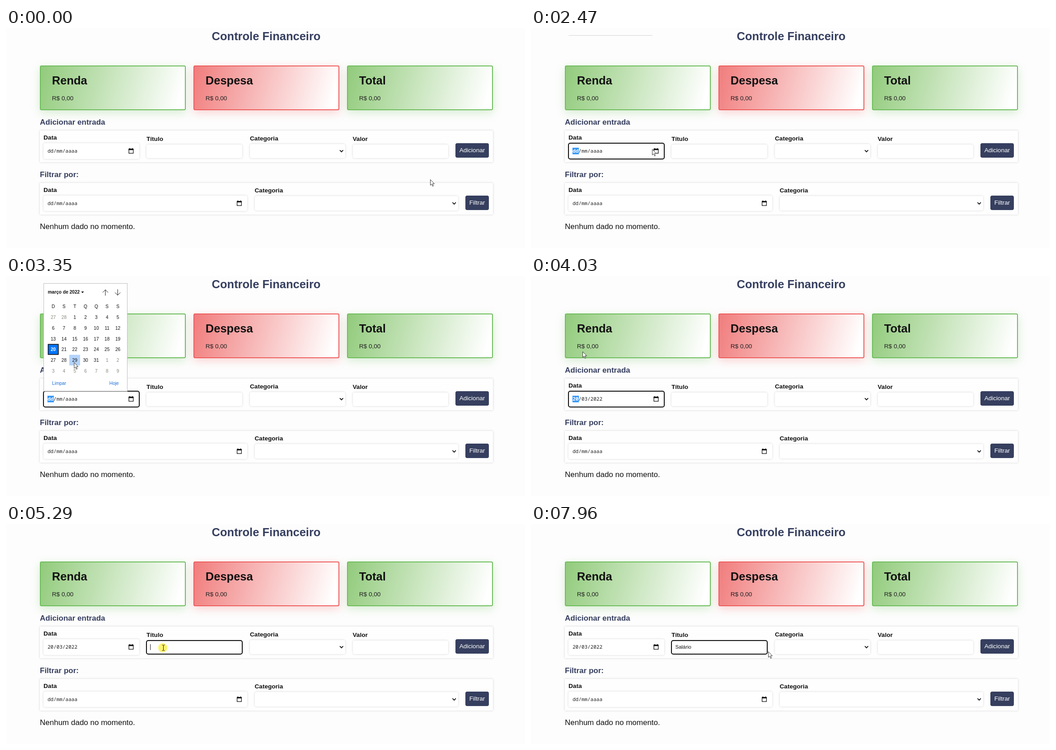
Recreate the animation shown at these times as an HTML page. Size 1149 px wide and 487 px high, loop 8 s.

```html
<!DOCTYPE html>
<html lang="pt-BR">
<head>
<meta charset="utf-8">
<title>Controle Financeiro</title>
<style>
  html, body { margin: 0; width: 100%; height: 100%; overflow: hidden; background: #fdfdfd; }
  #stage { position: relative; width: 1149px; height: 487px; overflow: hidden; }
  #stage div { position: absolute; box-sizing: border-box; }
  svg { position: absolute; left: 0; top: 0; font-family: "Liberation Sans", Arial, sans-serif; }
  .card { border: 2px solid var(--line); border-radius: 3.4px;
    background: linear-gradient(105deg, var(--fill), #fff 95%); box-shadow: 0 6px 20px var(--glow); }
  .green { --line: #6cbd5a; --fill: #92cb7c; --glow: rgba(108, 189, 90, .26); }
  .red { --line: #ee5c5c; --fill: #f17d7d; --glow: rgba(238, 92, 92, .26); }
  .panel { background: #fefefe; box-shadow: 0 0 4px #d0d0d0; }
  .field { background: #fff; border-radius: 4px; box-shadow: 0 0 4px #d6d6d6; }
  .focus { outline: 2px solid #101010; outline-offset: -1px; }
  .button { background: #363f5f; border-radius: 4px; }
  .b { font-weight: bold; }
  .navy { fill: #363f5f; }
  .mono { font: 11px "Noto Sans Mono", monospace; white-space: pre; }
  .mid { text-anchor: middle; }
  .selected { fill: #fff; font-weight: bold; }
  .stroke { fill: none; stroke: #111; }
</style>
</head>
<body>
<div id="stage"></div>
<script>
const LOOP = 8000, FRAME = 70;
const stage = document.getElementById('stage');

const box = (cls, { x, y, w, h, id = '' }) =>
  `<div id="${id}" class="${cls}" style="left:${x}px;top:${y}px;width:${w}px;height:${h}px"></div>`;
const text = (x, y, size, str, cls = '', fill = '#111') =>
  `<text x="${x}" y="${y}" class="${cls}" style="font-size:${size}px" fill="${fill}">${str}</text>`;

const cards = ['Renda', 'Despesa', 'Total'].map((name, i) =>
  ({ name, tone: i === 1 ? 'red' : 'green', x: 75 + 340 * i, y: 83, w: 323, h: 99 }));
const panels = [227, 343].map(y => ({ x: 75, y, w: 1003, h: 70 }));
const fields = [
  { name: 'Data', type: 'date', id: 'entry', x: 83, y: 255, w: 211.5, h: 34.5 },
  { name: 'Título', id: 'title', x: 311, y: 257.5, w: 212, h: 30 },
  { name: 'Categoria', type: 'select', x: 540, y: 256.5, w: 211, h: 31.5 },
  { name: 'Valor', x: 767.5, y: 257.5, w: 211, h: 30 },
  { name: 'Data', type: 'date', id: 'filter', x: 83, y: 371, w: 451, h: 34 },
  { name: 'Categoria', type: 'select', x: 550.5, y: 372, w: 450, h: 32 }
];
const buttons = [
  { name: 'Adicionar', x: 995, y: 255, w: 74, h: 32 },
  { name: 'Filtrar', x: 1017, y: 370.5, w: 52, h: 32 }
];

const dateInput = (x, right, cy, id) =>
  `<text x="${x + 9}" y="${cy + 4}" class="mono" fill="#222"><tspan id="${id}Day">dd</tspan><tspan id="${id}Rest">/mm/aaaa</tspan></text>
  <g transform="translate(${right - 23} ${cy - 5})">
    <path class="stroke" stroke-width="1.3" d="M.6.6h9.6v9.6H.6z"/>
    <path fill="#111" d="M0 0h10.8v3H0zM1.6-1.2h1.6v2H1.6zM7.6-1.2h1.6v2H7.6z"/>
  </g>`;
const chevron = (x, y) =>
  `<path class="stroke" stroke-width="1.8" d="M${x - 3.7} ${y - 1.8}l3.7 3.7 3.7-3.7"/>`;

function fieldContent({ name, type, id, x, y, w, h }) {
  const right = x + w, cy = y + h / 2;
  return text(x, y - 7.7, 13.6, name, 'b') +
    (type === 'date' ? dateInput(x, right, cy, id) : type === 'select' ? chevron(right - 8.3, cy) : '');
}

function calendar() {
  const step = 23.83, colX = c => 104.6 + step * c, rowY = r => 95 + step * r;
  let out = `<rect x="83.5" y="16.5" width="185" height="238.5" fill="#fff" stroke="#bdbdbd"/>
    <rect id="hover" x="140.2" y="174.4" width="23.8" height="23.6" fill="#b3d3fb"/>
    <rect x="93.4" y="151.3" width="22.4" height="22.4" fill="#0075ff" stroke="#101010" stroke-width="1.7"/>
    <path fill="#111" d="M166.5 34.3h6l-3 3.6z"/>
    <path class="stroke" d="M220 43.5v-13M214 36.5l6-6 6 6M247.2 29.5v13M241.2 36.5l6 6 6-6"/>`;
  out += text(92.5, 39, 10.2, 'março de 2022', 'b');
  [...'DSTQQSS'].forEach((d, c) => out += text(colX(c), rowY(-1), 10.2, d, 'mid'));
  for (let i = 0; i < 42; i++) {
    const date = new Date(2022, 1, 27 + i), day = date.getDate(), inMonth = date.getMonth() === 2;
    const cls = inMonth && day === 20 ? 'mid selected' : 'mid';
    out += text(colX(i % 7), rowY(Math.floor(i / 7)), 10.2, day, cls, inMonth ? '#111' : '#8b867c');
  }
  return out + text(102, 240.6, 10.2, 'Limpar', '', '#1a6fd6') + text(228.8, 240.6, 10.2, 'Hoje', '', '#1a6fd6');
}

stage.innerHTML =
  cards.map(c => box('card ' + c.tone, c)).join('') +
  panels.map(p => box('panel', p)).join('') +
  fields.map(f => box('field', f)).join('') +
  buttons.map(b => box('button', b)).join('') +
  `<svg width="1149" height="487">
  <rect id="daySelect" x="91.8" y="265" width="14.2" height="14.6" fill="#3797f5"/>` +
  text(576, 26.7, 25.5, 'Controle Financeiro', 'b navy mid') +
  cards.map(({ name, x }) =>
    text(x + 26.8, 125, 25.5, name, 'b') + text(x + 26.8, 159.7, 13.6, 'R$ 0,00', '', '#222')).join('') +
  text(75, 214, 17, 'Adicionar entrada', 'b navy') +
  text(75, 329.7, 17, 'Filtrar por:', 'b navy') +
  text(75, 445, 17, 'Nenhum dado no momento.') +
  fields.map(fieldContent).join('') +
  buttons.map(b => text(b.x + b.w / 2, b.y + 20.2, 13.6, b.name, 'mid', '#fff')).join('') +
  `<text id="typed" x="319.5" y="276.2" font-size="11.33" fill="#111"></text>
  <rect id="caret" y="266" width="1" height="13" fill="#111"/>
  <path id="opening" class="stroke" style="stroke:#d4d4d4" d="M83 16.5h186"/>
  <g id="calendar">${calendar()}</g>
  <circle id="click" r="10.2" fill="#fbee3c" fill-opacity=".72"/>
  <path id="arrow" d="M.5.6V13.2L3.4 10.5 5.5 15.4 7.4 14.6 5.4 9.8H9.4Z" fill="#fff" stroke="#222" stroke-width=".9"/>
  <path id="beam" class="stroke" d="M-3-6h2.2l.8.7.8-.7H3M0-5.5v11M-3 6h2.2l.8-.7.8.7H3"/></svg>`;

const $ = id => document.getElementById(id);
const show = (id, on) => { $(id).style.display = on ? '' : 'none'; };

// Pointer glides: first frame, last frame, destination
const origin = [939, 335];
const glides = [
  [70, 165, 823, 241], [260, 260, 962, 269], [650, 800, 619, 162], [990, 1200, 272, 255],
  [1450, 1660, 292, 273], [1920, 2030, 268, 268], [2920, 3040, 155, 194], [3350, 3490, 114, 167],
  [4500, 4640, 361, 289], [4960, 5030, 348.5, 274], [7820, 7960, 525, 282]
];

// Each glide accelerates and is seen only at whole frames.
function pointerAt(t) {
  let [x, y] = origin;
  for (const [from, to, toX, toY] of glides) {
    if (t < from) break;
    const steps = Math.round((to - from) / FRAME) + 1;
    const shown = t >= to ? steps : Math.floor((t - from) / (to - from) * (steps - 1)) + 1;
    const k = (shown / steps) ** 2;
    x += (toX - x) * k;
    y += (toY - y) * k;
  }
  return [x, y];
}

const word = 'Salário';
const keyTimes = [6050, 6160, 6580, 6960, 7220, 7220 + FRAME, 7220 + 2 * FRAME];

function render(t) {
  const within = (a, b) => t >= a && t < b;
  const [x, y] = pointerAt(t);
  const beam = within(260, 650) || within(5030, 7820);
  show('arrow', !beam);
  show('beam', beam);
  $(beam ? 'beam' : 'arrow').setAttribute('transform', `translate(${x} ${y})`);
  show('click', within(2280, 2470) || within(3830, 4030) || within(5290, 5490));
  $('click').setAttribute('transform', `translate(${beam ? x - 1.5 : x} ${y})`);

  const dateFocus = within(2280, 5290), picked = t >= 4030;
  $('entry').classList.toggle('focus', dateFocus);
  $('title').classList.toggle('focus', t >= 5290);
  show('daySelect', dateFocus);
  $('entryDay').classList.toggle('selected', dateFocus);
  $('entryDay').textContent = picked ? '20' : 'dd';
  $('entryRest').textContent = picked ? '/03/2022' : '/mm/aaaa';

  show('opening', within(2470, 2540));
  show('calendar', within(2540, 4030));
  show('hover', within(3040, 3420));

  $('typed').textContent = word.slice(0, keyTimes.filter(k => k <= t).length);
  show('caret', within(5290, 5830) || within(6050, 7820));
  $('caret').setAttribute('x', 319.2 + $('typed').getComputedTextLength());
}

const start = performance.now();
function tick() {
  render((performance.now() - start) % LOOP);
  requestAnimationFrame(tick);
}
tick();
</script>
</body>
</html>
```
